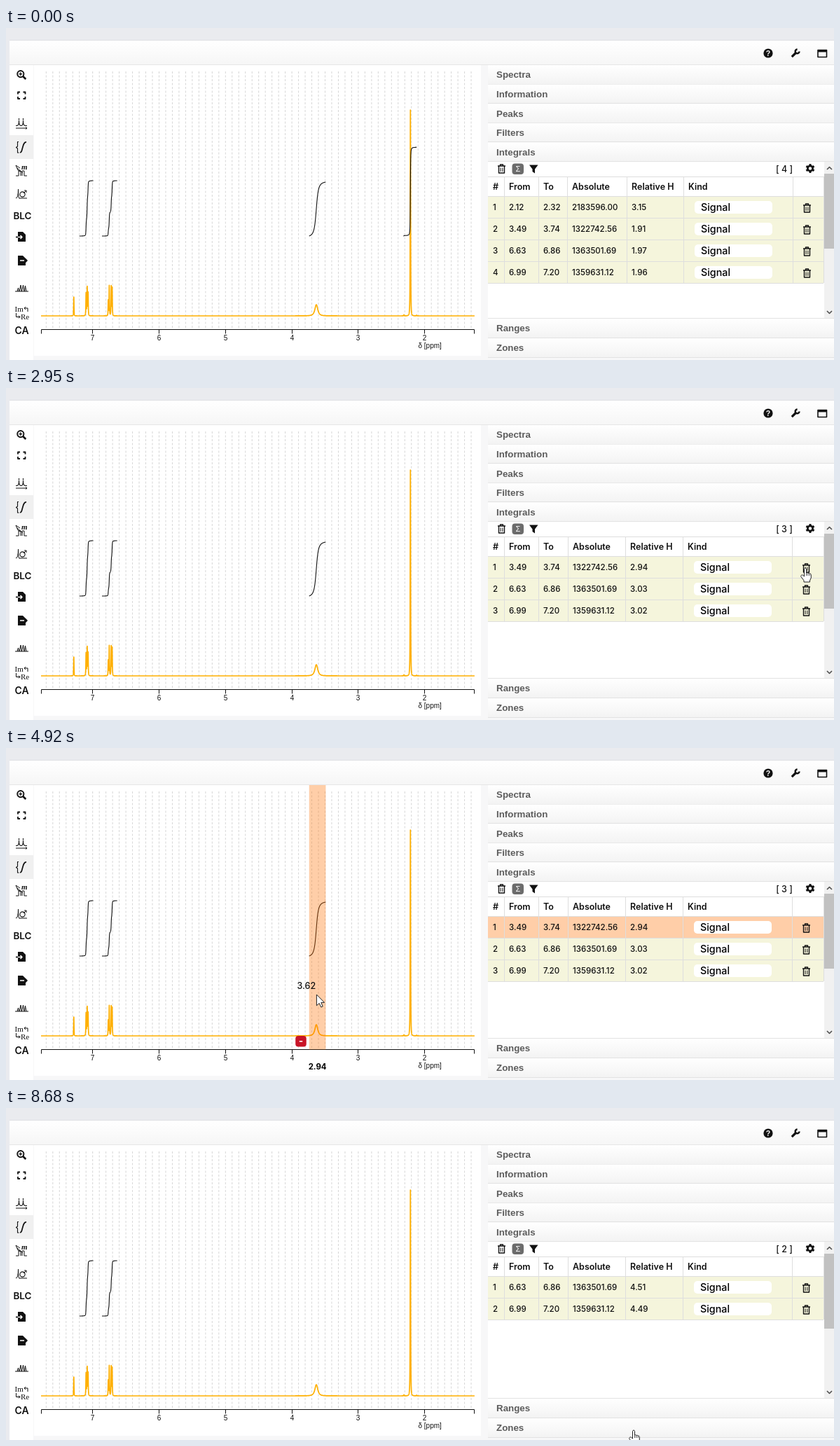
Animation, 1182 px wide and 474 px high, one loop 8760 ms. Source, as an HTML page with a canvas:

```html
<!DOCTYPE html>
<html lang="en">
<head>
<meta charset="utf-8">
<title>Integrals</title>
<style>
html, body { margin: 0; width: 100%; height: 100%; overflow: hidden; background: #f7f7f8; }
canvas { display: block; width: 1182px; height: 474px; }
</style>
</head>
<body>
<canvas id="stage"></canvas>
<script>
const W = 1182, H = 474, LOOP = 8760, LAG = 70;
const canvas = document.getElementById('stage');
const ctx = canvas.getContext('2d');
const ratio = window.devicePixelRatio || 1;
canvas.width = W * ratio;
canvas.height = H * ratio;

const SANS = '"Liberation Sans", Arial, sans-serif';
const UI = 'Inter, sans-serif';
const SERIF = '"Liberation Serif", serif';
const INK = '#111', HOVER = 'rgba(255,111,0,.34)';

// ---------- drawing helpers ----------
function rect(x, y, w, h, color) {
  ctx.fillStyle = color;
  ctx.fillRect(x, y, w, h);
}
function round(x, y, w, h, r, color) {
  ctx.fillStyle = color;
  ctx.beginPath();
  ctx.roundRect(x, y, w, h, r);
  ctx.fill();
}
function disc(x, y, r, color) {
  ctx.fillStyle = color;
  ctx.beginPath();
  ctx.arc(x, y, r, 0, 7);
  ctx.fill();
}
function ring(x, y, r, width, from = 0, to = 7) {
  ctx.strokeStyle = INK;
  ctx.lineWidth = width;
  ctx.beginPath();
  ctx.arc(x, y, r, from, to);
  ctx.stroke();
}
const asPath = d => typeof d === 'string' ? new Path2D(d) : d;
function line(d, width = 1, color = INK) {
  ctx.strokeStyle = color;
  ctx.lineWidth = width;
  ctx.stroke(asPath(d));
}
function fill(d, color = INK) {
  ctx.fillStyle = color;
  ctx.fill(asPath(d));
}
function text(s, x, y, font, color = INK, align = 'left') {
  ctx.font = font;
  ctx.fillStyle = color;
  ctx.textAlign = align;
  ctx.fillText(s, x, y);
}
function shade(x, y, w, h, top, bottom) {
  const g = ctx.createLinearGradient(0, y, 0, y + h);
  g.addColorStop(0, top);
  g.addColorStop(1, bottom);
  rect(x, y, w, h, g);
}

// ---------- spectrum ----------
const BASE = 411;
const toX = ppm => 597.7 - (ppm - 2) * 94.8;
const toPpm = x => 2 - (x - 597.7) / 94.8;

// centre, height, width
const peaks = [
  [96.8, 27, .35],
  [114.3, 32, .4], [115.9, 41, .5], [117.2, 32, .35],
  [146, 22, .35], [147.4, 43, .4], [150.2, 42, .4], [151.5, 40, .4],
  [443, 16, 3], [577.3, 294, .4], [568, 1.6, .4], [586, 1, .4]
];
const signal = x => peaks.reduce((s, [c, h, w]) => s + h / (1 + ((x - c) / w) ** 2) ** 1.4, 0);

function curve(x1, x2, step, yAt) {
  const p = new Path2D();
  p.moveTo(x1, yAt(x1));
  for (let x = x1 + step; x <= x2; x += step) p.lineTo(x, yAt(x));
  return p;
}
const spectrum = curve(50, 669, .1, x => BASE - signal(x));

function integralCurve(x1, x2, height) {
  let total = 0, sum = 0;
  for (let x = x1; x <= x2; x += .1) total += signal(x);
  return curve(x1, x2, .1, x => 297 - height * (sum += signal(x)) / total);
}

const integrals = [
  [2.12, 2.32, 2183596.00, 127],
  [3.49, 3.74, 1322742.56, 77],
  [6.63, 6.86, 1363501.69, 79],
  [6.99, 7.20, 1359631.12, 79]
].map(([from, to, area, height]) => {
  const x1 = toX(to), x2 = toX(from);
  return { from, to, area, x1, x2, path: integralCurve(x1, x2, height) };
});

// ---------- pointer ----------
const out = p => u => 1 - (1 - u) ** p;
const smooth = u => u * u * (3 - 2 * u);
// first and last change, number of steps, start, end, easing in x and y
const moves = [
  [540, 1280, 11, [1091, 500], [1141, 258], out(2.32), out(2.32)],
  [3350, 3840, 7, [1141, 258], [581, 302], out(2.07), smooth],
  [4150, 4920, 11, [581, 302], [443.4, 352], out(2), out(2)],
  [5000, 5680, 10, [443.4, 352], [425, 417], out(3.3), out(3.3)],
  [5830, 5910, 2, [425, 417], [426.3, 417], out(1), out(1)],
  [8450, 8680, 4, [426.3, 417], [896, 461], out(2), out(2)]
];

function pointer(time) {
  const t = time + 5;
  const move = moves.filter(m => t >= m[0]).pop();
  if (!move) return null;
  const [t0, t1, n, a, b, ex, ey] = move;
  const i = Math.min(n - 1, Math.floor((t - t0) / (t1 - t0) * (n - 1)));
  const u = (i + 1) / n;
  return { x: a[0] + (b[0] - a[0]) * ex(u), y: a[1] + (b[1] - a[1]) * ey(u) };
}

const onChart = p => p && p.x > 50 && p.x < 669 && p.y > 52 && p.y < 431;

function rowAt(p, count) {
  if (!p || p.x < 688 || p.x > 1167) return -1;
  const i = Math.floor((p.y - 6 - 240) / 31);
  return i >= 0 && i < count ? i : -1;
}

// ---------- icons ----------
function trash(x, y) {
  line(`M${x - 5.5} ${y - 4}h11M${x - 2} ${y - 4}v-2h4v2M${x - 4} ${y - 4}v10h8v-10`, 1.4);
  line(`M${x - 1.4} ${y - 1.5}v5.5M${x + 1.4} ${y - 1.5}v5.5`, 1);
}
function gear(x, y) {
  ring(x, y, 3.6, 2.8);
  for (let i = 0; i < 6; i++) {
    const a = i * Math.PI / 3 + Math.PI / 6, c = Math.cos(a), s = Math.sin(a);
    line(`M${x + c * 4} ${y + s * 4}L${x + c * 6.4} ${y + s * 6.4}`, 3);
  }
}
function fileIcon(y) {
  fill(`M17 ${y - 7}h7l4 4v10h-11z`);
}

function leftTools() {
  rect(5, 153, 34, 34, '#f0f0f0');
  ring(20.8, 65.6, 4.6, 1.9);
  line('M24.2 69L28.3 73', 2.6);
  line('M18.4 65.6h4.8M20.8 63.2v4.8', 1.3);
  line('M17 94.5V91.5H20M24.5 91.5H27.5V94.5M27.5 98V101H24.5M20 101H17V98', 1.8);

  line('M14 139.5H16Q18.5 139 18.5 132Q18.5 139 21 139.5H22Q24.5 139 24.5 132Q24.5 139 27 139.5H30', 1.1);
  line('M18.5 129V131M24.5 129V131', 1.2);
  line('M14 143H30M28 141.5L30 143L28 144.5', 1);

  line('M18 162.5H16.5V169L14.5 170.5L16.5 172V178H18.5', 1.1);
  line('M20 177.5C24 179 23 162 29 163', 1.7);

  line('M14 196L20 200M14 196L17 203L21 205M15 199L24 207', 1);
  text('m', 22, 202, 'italic bold 11px ' + SERIF);
  line('M14 211H18V204H21V211M23 211V204H26V211H30', 1);

  line('M14 243Q17.5 243 17.5 230Q17.5 246 20 243L30 243', 1);
  ring(23.5, 237.5, 3.6, 1.1);
  line('M25 236L29 232M29 235V232H26', 1);

  text('BLC', 23.5, 272.5, '600 13.5px ' + UI, INK, 'center');
  fileIcon(298);
  line('M14 298.5H23M20.5 296L23 298.5L20.5 301', 1.5, '#fff');
  line('M14 298.5H17', 1.8);
  fileIcon(332);
  line('M20 332H26', 1.5, '#fff');
  line('M26 332H30M27.5 329.5L30 332L27.5 334.5', 1.7);

  line('M13 376H32M16 376L17.5 371L18.5 376M19 376L21 367L22 376M22.5 376L24.5 367L26 376M26.5 376L27.5 368L29 376', 1);
  text('Im', 12.5, 404.5, '11px ' + SERIF);
  text('Re', 21, 416, '11px ' + SERIF);
  line('M26 400H31V405M28 398L26 400L28 402M14.5 407V412.5H20M18 410.5L20 412.5L18 414.5', 1);
  text('CA', 22.5, 436.5, '600 14px ' + UI, INK, 'center');
}

function topTools() {
  disc(1088, 36, 6.6, INK);
  text('?', 1088, 39.8, 'bold 10.5px ' + SANS, '#fff', 'center');
  line('M1121.8 41.2L1128 35', 3.2);
  ring(1129.6, 33.4, 2.9, 2.5, 0, Math.PI * 1.5);
  line('M1159 31.5H1171.5V41.5H1159Z', 1.6);
  rect(1159, 31, 12.5, 3.4, INK);
}

// ---------- page ----------
function frame() {
  rect(0, 0, W, H, '#f7f7f8');
  rect(0, 0, W, 18, '#eaebef');
  rect(0, 0, 5, H, '#eaebef');
  shade(5, 18, W - 5, 34, '#ffffff', '#f6f6f6');
  rect(5, 17, W - 5, 1, '#dfe0e3');
  rect(5, 52, W - 5, 1, '#e6e6e6');
  rect(5, 53, 34, H - 53, '#fff');
  rect(40, 53, 638, 415, '#fff');
  topTools();
  leftTools();
}

function chart(shown, active, mouse) {
  ctx.setLineDash([3, 2.5]);
  for (let i = 13; i <= 77; i++) {
    const x = toX(i / 10);
    line(`M${x} 62V430`, 1, '#d6d6d6');
  }
  ctx.setLineDash([]);

  line('M50.5 436.5V430.5H668.5V436.5', 1);
  for (let ppm = 2; ppm <= 7; ppm++) {
    const x = Math.floor(toX(ppm)) + .5;
    line(`M${x} 430.5V436.5`);
    text(ppm, x, 446, '10px ' + SANS, INK, 'center');
  }
  text('δ [ppm]', 588.5, 457, '10px ' + SANS);

  line(spectrum, 1.7, '#ffb000');
  shown.forEach(it => line(it.path, 1.1));

  if (active) {
    const { x1, x2 } = active;
    rect(x1, 53, x2 - x1, 377.5, HOVER);
    text(active.relative, (x1 + x2) / 2, 459, '700 11.4px ' + UI, '#000', 'center');
    round(x1 - 19.5, 411, 15.5, 15.5, 4, '#c81427');
    rect(x1 - 14, 418, 4.5, 1.6, '#fff');
  }
  if (onChart(mouse)) {
    text(toPpm(mouse.x).toFixed(2), mouse.x - 29, mouse.y - 7.5, '500 12.5px ' + UI);
  }
}

function header(label, y, h = 27.5) {
  shade(688, y, W - 688, h, '#ffffff', '#f3f3f3');
  rect(688, Math.round(y + h) - 1, W - 688, 1, '#e2e2e2');
  text(label, 700, y + 18.3, `bold 13.33px ${SANS}`, '#5c5c5c');
}

function panel(shown, active) {
  ['Spectra', 'Information', 'Peaks', 'Filters', 'Integrals'].forEach((s, i) => header(s, 53 + i * 27.6));
  rect(688, 191, W - 688, 224, '#fff');
  rect(688, 414, W - 688, 1, '#e2e2e2');
  header('Ranges', 415);
  header('Zones', 443);

  trash(707.5, 201);
  round(722.5, 193.5, 16.5, 15.5, 4, '#6c6c6c');
  text('Σ', 730.8, 205.3, `11px ${SANS}`, '#fff', 'center');
  fill('M747 195.5H759.5L755 201.5V207.5L751.5 205V201.5Z');
  text(`[ ${shown.length} ]`, 1111, 205.5, '500 12.5px ' + UI, INK, 'center');
  gear(1148, 200.5);

  rect(1168, 191, 14, 223, '#f1f1f1');
  rect(1168, 208, 14, 107, '#c1c1c1');
  line('M1172 202L1175.5 198.5L1179 202M1172 404L1175.5 407.5L1179 404', 1.6, '#505050');

  table(shown, active);
}

function table(shown, active) {
  const full = shown.length === 4;
  const cols = full ? [711, 760, 801, 886, 967, 1123] : [711, 760, 802, 884, 966, 1122];
  const [, , cAbs, cRel, cKind, cDel] = cols;
  const bottom = 240 + 31 * shown.length;
  const bold = '600 12.5px ' + UI, plain = '500 11.5px ' + UI;

  rect(688, 240, 479, bottom - 240, '#f5f5dc');
  shown.forEach((it, i) => {
    if (it === active) {
      rect(688, 240 + 31 * i, 479, 31, '#fff');
      rect(688, 240 + 31 * i, 479, 31, HOVER);
    }
  });
  for (let y = 240; y <= bottom; y += 31) rect(688, y, 479, 1, '#dedede');
  rect(688, 212, 479, 1, '#dedede');
  [...cols, 1167].forEach(x => rect(x, 212, 1, bottom - 212, '#dedede'));

  const xs = [695, 718, 767, cAbs + 7, cRel + 7, cKind + 7];
  ['#', 'From', 'To', 'Absolute', 'Relative H', 'Kind'].forEach((s, i) => text(s, xs[i], 231, bold));
  shown.forEach((it, i) => {
    const y = 240 + 31 * i;
    [i + 1, it.from.toFixed(2), it.to.toFixed(2), it.area.toFixed(2), it.relative]
      .forEach((s, k) => text(s, xs[k], y + 19.5, plain));
    round(cKind + 16, y + 7, 111, 18, 5, '#fff');
    text('Signal', cKind + 25, y + 20.8, '500 14.3px ' + UI, '#000');
    trash(cDel + 20.5, y + 17);
  });
}

function drawPointer(p, hand) {
  ctx.save();
  ctx.translate(p.x, p.y);
  const shape = new Path2D(hand
    ? 'M-1.5 11V.5C-1.5 -1.4 1.5 -1.4 1.5 .5V6C2 5.4 3.6 5.6 3.8 6.5C4.5 6 6 6.2 6.2 7.2C7 6.8 8.3 7.2 8.3 8.5V13L6.5 17V19H-2V16.8L-6 11.5C-7 9.5 -4.5 8 -3 9.6Z'
    : 'M0 0V15.8L3.8 12.4L6.4 18L8.8 17L6.4 11.4H11.2Z');
  fill(shape, '#fff');
  line(shape, 1, '#222');
  if (hand) line('M1.5 6V10M3.8 6.5V10M6.2 7.2V10', .8, '#222');
  ctx.restore();
}

function draw(t) {
  ctx.setTransform(ratio, 0, 0, ratio, 0, 0);
  ctx.lineJoin = 'round';
  const removed = t < 2950 ? 0 : t < 7500 ? 1 : 2;
  const rest = integrals.slice(removed);
  const total = rest.reduce((s, it) => s + it.area, 0);
  const shown = rest.map(it => ({ ...it, relative: (it.area / total * 9).toFixed(2) }));

  // the page reacts one step after the pointer
  const mouse = pointer(t), seen = pointer(t - LAG);
  const row = rowAt(seen, shown.length);
  let active = shown[row];
  if (onChart(seen)) active = shown.find(it => seen.x > it.x1 - 22 && seen.x < it.x2);
  if (t >= 2950 && t < 3030) active = undefined;

  frame();
  chart(shown, active, seen);
  panel(shown, active);

  if (!mouse) return;
  const pressed = (t >= 2220 && t < 2950) || (t >= 6470 && t < 7500);
  if (pressed) disc(mouse.x, mouse.y - .5, 12, 'rgba(255,238,0,.5)');
  const onHeader = seen && seen.x > 688 && seen.y > 415;
  const onTrash = row >= 0 && seen.x > 1134;
  drawPointer(mouse, onHeader || onTrash);
}

const start = performance.now();
function tick() {
  draw((performance.now() - start) % LOOP);
  requestAnimationFrame(tick);
}
tick();
</script>
</body>
</html>
```
